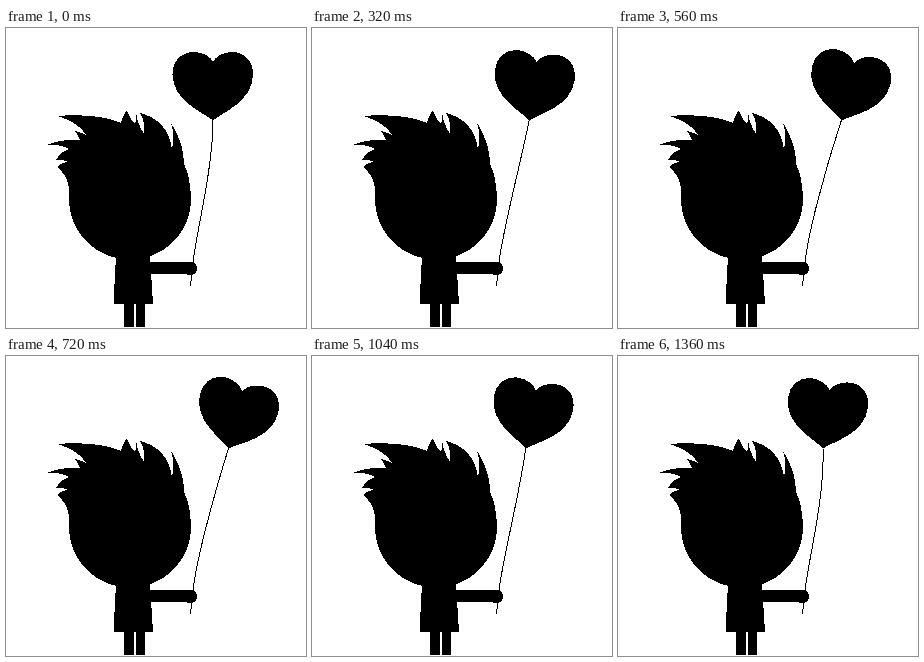
Animation of 300 by 300 pixels, one loop 1.44 s. Source, as an HTML page:

```html
<!DOCTYPE html>
<html lang="en">
<head>
<meta charset="utf-8">
<title>Heart balloon</title>
<style>
  html, body { margin: 0; width: 100%; height: 100%; overflow: hidden; background: #fff; }
  svg { display: block; width: 100%; height: 100%; shape-rendering: crispEdges; }
</style>
</head>
<body>
<svg viewBox="0 0 300 300">
  <g id="boy">
    <ellipse cx="124" cy="171" rx="61" ry="60.5"/>
    <path id="hair" d="M51 88 C75 86 100 88 115 95 Q117 87 121 82 Q123 90 129 96
      Q131 91 130 85 Q132 97 138 106 Q140 96 134 85 Q162 92 166 121
      Q169 107 165 95 Q178 115 178 136 Q184 147 185 170 L125 210 L63 170
      Q65 150 51 139 Q56 134 62 134 Q56 131 50 132 Q54 124 63 121 Q54 116 41 117
      Q54 111 74 112 Q72 107 69 103 Q74 104 80 107 Q72 94 51 88Z"/>
    <path id="shirt" d="M110 227 H144 L147 276 H107.500Z"/>
    <path id="legs" d="M118 275 h10 v24 h-10Z M130 275 h9 v24 h-9Z"/>
    <path id="arm" d="M144 234 h40 v12 h-40Z"/>
    <circle id="hand" cx="184" cy="240.500" r="7"/>
  </g>
  <path id="string" fill="none" stroke="#000"/>
  <path id="heart" d="M0 0 C-9 -8 -40.500 -19 -40.500 -46 C-40.500 -60 -31 -68.500 -19.500 -68.500
    C-10 -68.500 -3 -64 0 -59 C3 -64 10 -68.500 19.500 -68.500
    C31 -68.500 40 -60 40 -46 C40 -19 9 -8 0 0Z"/>
</svg>
<script>
  const STEP = 80, STEPS = 18, PEAK = 8;
  const TIP_Y = 92.5;
  const heart = document.getElementById('heart');
  const string = document.getElementById('string');
  const mix = (from, to, part) => from + (to - from) * part;

  // Drift out to the right, then fall back evenly and snap upright
  function pose(step) {
    if (step <= PEAK) {
      const part = step / PEAK;
      return { x: mix(207, 225, 1 - (1 - part) ** 1.25), tilt: mix(0, 14, part) };
    }
    const part = (step - PEAK) / (STEPS - 1 - PEAK);
    return { x: mix(225, 205, part), tilt: mix(14, 6.5, part) };
  }

  function draw(now) {
    const { x, tilt } = pose(Math.floor(now / STEP) % STEPS);
    heart.setAttribute('transform', `translate(${x} ${TIP_Y}) rotate(${tilt})`);
    string.setAttribute('d', `M${x} ${TIP_Y - 1} C207 142 190 205 187 235 L184.5 258`);
    requestAnimationFrame(draw);
  }
  draw(0);
</script>
</body>
</html>
```
